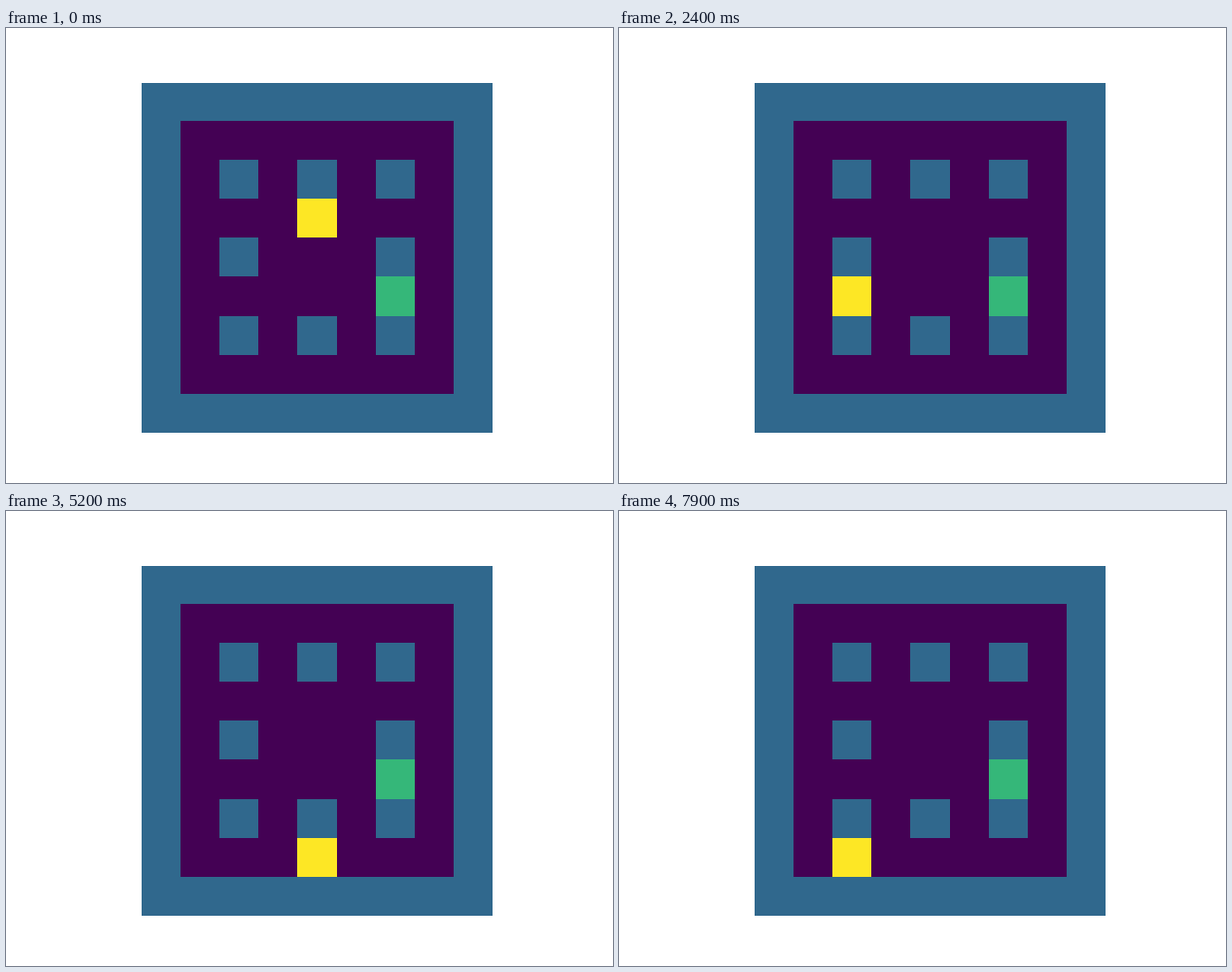
Write an HTML page with a canvas that moves like this. It is 640 px wide and 480 px high and loops after 8000 ms.

```html
<!DOCTYPE html>
<html lang="en">
<head>
<meta charset="utf-8">
<title>Grid walk</title>
<style>
html, body { margin: 0; width: 100%; height: 100%; overflow: hidden; background: #fff; }
canvas { display: block; }
</style>
</head>
<body>
<canvas id="stage" width="640" height="480"></canvas>
<script>
const ctx = document.getElementById('stage').getContext('2d');
const STEP = 100;
const WALL = '#30688d', FLOOR = '#440154', GOAL = '#35b779', AGENT = '#fde725';
const MOVES = { L: [-1, 0], R: [1, 0], U: [0, -1], D: [0, 1], '.': [0, 0] };

// Pixel edges of the 9 x 9 grid
const edgeX = i => Math.round(143.2 + 41.0667 * i);
const edgeY = i => Math.max(58, Math.floor(57.65 + 41.066 * i));

function fill(color, col, row, size = 1) {
  const x = edgeX(col), y = edgeY(row);
  ctx.fillStyle = color;
  ctx.fillRect(x, y, edgeX(col + size) - x, edgeY(row + size) - y);
}

// All cells visited from a starting cell
function walk(col, row, moves) {
  const cells = [[col, row]];
  for (const m of moves) {
    col += MOVES[m][0];
    row += MOVES[m][1];
    cells.push([col, row]);
  }
  return cells;
}

// The agent is placed anew at the start of each walk
const path = [
  ...walk(4, 3, ''),
  ...walk(7, 1, 'LLDDLDDLUURRDDDDLLUUUDL'),
  ...walk(1, 7, 'RRRRUULLLLUURRRRDDLLUUDDDDRRUUUULLLLDDRRDDLLUUU.DRRDDL')
];

function draw(now) {
  const [col, row] = path[Math.floor(now / STEP) % path.length];
  ctx.fillStyle = '#fff';
  ctx.fillRect(0, 0, 640, 480);
  fill(WALL, 0, 0, 9);
  fill(FLOOR, 1, 1, 7);
  for (let r = 2; r < 8; r += 2)
    for (let c = 2; c < 8; c += 2)
      if (r !== 4 || c !== 4) fill(WALL, c, r);
  fill(GOAL, 6, 5);
  fill(AGENT, col, row);
}

const start = performance.now();
function tick() {
  draw(performance.now() - start);
  requestAnimationFrame(tick);
}
tick();
</script>
</body>
</html>
```
